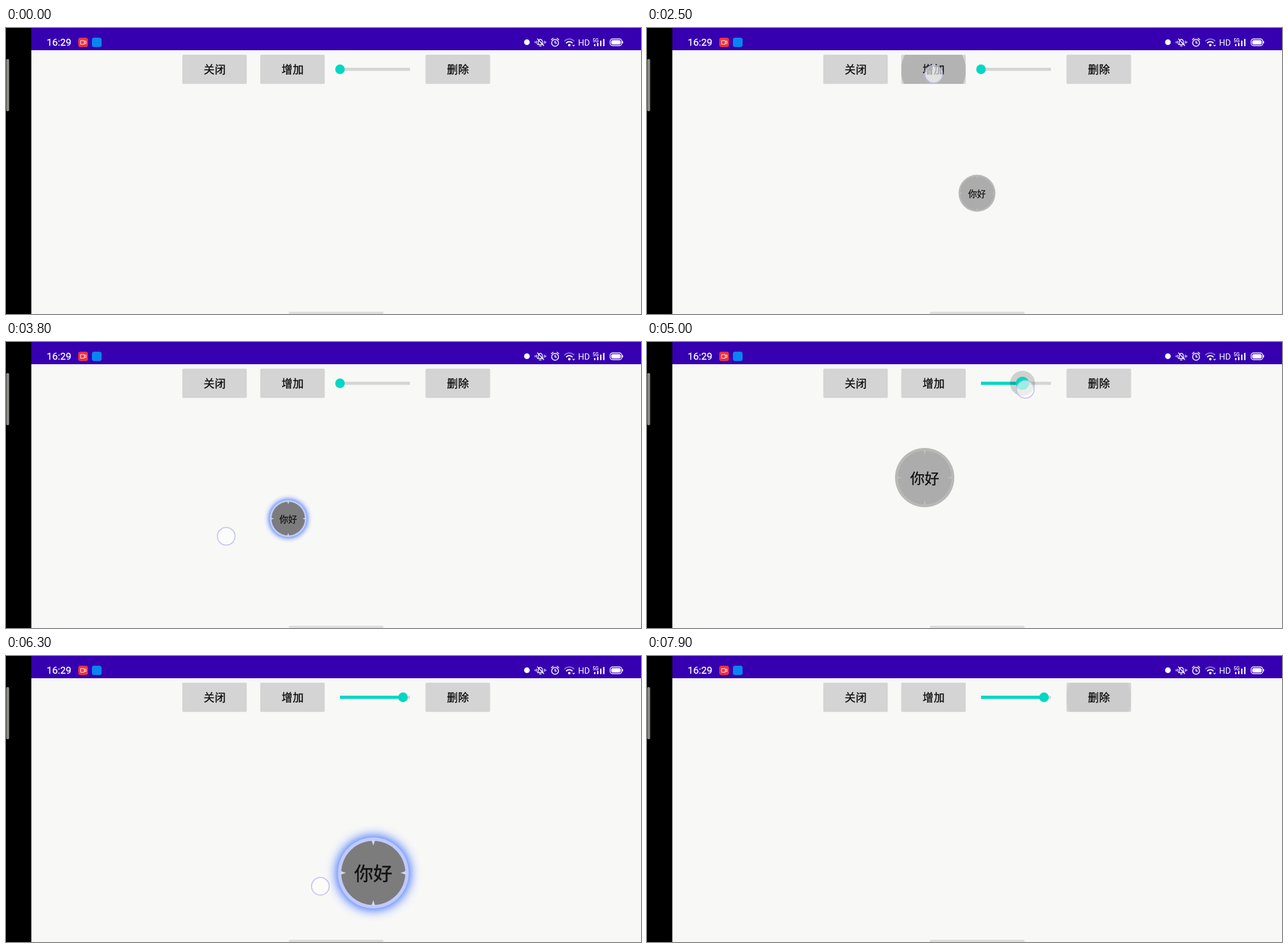
An HTML page with a canvas that plays this animation: 1116 px wide and 502 px high, repeating every 8 s.

```html
<!DOCTYPE html>
<html lang="zh">
<head>
<meta charset="utf-8">
<style>
  html, body { margin: 0; width: 100%; height: 100%; overflow: hidden; background: #f8f8f7; }
  canvas { display: block; }
</style>
</head>
<body>
<canvas id="stage" width="1116" height="502"></canvas>
<script>
const c = document.getElementById('stage').getContext('2d');
const FONT = 'Roboto, "Noto Sans CJK SC", "Noto Sans CJK", sans-serif';
const LOOP = 8000, STEP = 100;
const TRACK = { from: 587, to: 710, y: 72.5 };

const clamp = v => Math.max(0, Math.min(1, v));
const ramp = (t, a, b) => clamp((t - a) / (b - a));
const ease = v => v * v * (3 - 2 * v);
const within = (t, a, b) => t >= a && t < b;

// Catmull-Rom through rows of [time, value, value...]
function along(t, keys) {
  const last = keys.length - 1;
  if (t <= keys[0][0]) return keys[0].slice(1);
  if (t >= keys[last][0]) return keys[last].slice(1);
  const i = keys.findIndex(k => k[0] > t) - 1;
  const u = ramp(t, keys[i][0], keys[i + 1][0]);
  const at = n => keys[Math.max(0, Math.min(last, n))];
  return keys[i].slice(1).map((_, j) => {
    const [p, q, r, s] = [i - 1, i, i + 1, i + 2].map(n => at(n)[j + 1]);
    return q + u / 2 * (r - p + u * (2 * p - 5 * q + 4 * r - s + u * (3 * (q - r) + s - p)));
  });
}

const firstDrag = [[2900, 580, 290], [3100, 592, 299], [3400, 600, 329], [3600, 554, 363],
  [3800, 496, 310], [4000, 474, 256], [4200, 488, 238]];
const secondDrag = [[5800, 488, 238], [5950, 404, 294], [6100, 470, 386], [6300, 645.5, 380.7],
  [6450, 855, 290], [6600, 775, 170], [6800, 706, 296], [7000, 700, 359]];
const slide = [[4800, 0], [4900, .27], [5000, .593], [5200, 1], [5300, .97], [5400, .9]];

function text(str, x, baseline, size, color, { align = 'left', weight = 400, spacing = 0, bold = 0 } = {}) {
  c.font = `${weight} ${size}px ${FONT}`;
  c.textAlign = align;
  c.letterSpacing = spacing + 'px';
  c.fillStyle = c.strokeStyle = color;
  c.fillText(str, x, baseline);
  if (bold) {
    c.lineWidth = bold;
    c.strokeText(str, x, baseline);
  }
  c.letterSpacing = '0px';
}

function box(x, y, w, h, r, color) {
  c.beginPath();
  c.roundRect(x, y, w, h, r);
  c.fillStyle = color;
  c.fill();
}

function disc(x, y, r, color) {
  c.beginPath();
  c.arc(x, y, r, 0, 7);
  c.fillStyle = color;
  c.fill();
}

function stroke(path, color = '#fff', width = 1.6) {
  c.strokeStyle = color;
  c.lineWidth = width;
  c.lineCap = c.lineJoin = 'round';
  c.stroke(new Path2D(path));
}

function faded(alpha, draw) {
  if (alpha <= 0) return;
  c.save();
  c.globalAlpha *= alpha;
  draw();
  c.restore();
}

function shadow(color, blur, dy = 0) {
  c.shadowColor = color;
  c.shadowBlur = blur;
  c.shadowOffsetY = dy;
}

function statusIcons(t) {
  disc(915.5, 25, 5, '#fff');
  // muted bell
  stroke('M934 29h10l-1.500-2.500v-3a3.500 3.500 0 0 0-7 0v3zM937.500 31.500h3M934 19l11 12', '#fff', 1.4);
  stroke('M932.500 23v4M930 24v2M946 23v4M948.500 24v2', '#fff', 1.3);
  // alarm
  stroke('M971 26a6 6 0 1 0-12 0a6 6 0 1 0 12 0M965 23v3.500h2.500M958.500 20.500l3-2.500M968.500 18l3 2.500');
  // wifi
  const strong = within(t, 800, 1800);
  stroke('M982 22.500a11.500 11.500 0 0 1 16 0', strong ? '#fff' : '#8c70d5', 2);
  stroke('M985 26a7.500 7.500 0 0 1 10 0', '#fff', 2);
  disc(990, 30, 2.2, '#fff');
  stroke('M996 30l1.500 1.500l1.500-1.500', '#fff', 1.2);
  text('HD', 1005.5, 31, 15, '#fff');
  text('5G', 1031, 24.5, 8.5, '#fff', { weight: 500 });
  [4, 6, 10, 13].forEach((h, i) => box(1033.5 + i * 5.3, 32 - h, 2.4, h, 1, '#fff'));
  c.strokeStyle = '#fff';
  c.lineWidth = 1.4;
  c.beginPath();
  c.roundRect(1061.7, 19.2, 20.6, 11.8, 4);
  c.stroke();
  box(1063.7, 21.2, 16.6, 7.8, 2.5, '#fff');
  box(1083, 23, 1.5, 4, 1, '#fff');
}

function statusBar(t, banner) {
  box(44, 0, 1072, 39, 0, '#3600b1');
  faded(1 - banner, () => {
    text('16:29', 71.5, 31, 17.4, '#fff', { bold: .3 });
    box(127, 17, 17, 16.5, 4, '#f0303f');
    stroke('M131.500 22h6v6.500h-6zM137.500 24.500l3-1.800v5l-3-1.800', '#fff', 1);
    box(151, 17, 17, 16.5, 4, '#0a84f0');
  });
  faded(banner, () => {
    disc(263.5, 25, 7, '#fff');
    text('絮笺', 280.5, 31.5, 16.5, '#fff');
  });
  statusIcons(t);
}

function button(label, x, ripple = 0, fade = 0) {
  c.save();
  shadow('rgba(0,0,0,.1)', 2);
  box(x, 47, 113, 51, 2, '#d4d4d4');
  c.restore();
  if (ripple && fade < 1) {
    c.save();
    c.beginPath();
    c.rect(x, 47, 113, 51);
    c.clip();
    disc(x + 56.5, 74, 8 + 49 * ripple, `rgba(0,0,0,${.155 * (1 - fade)})`);
    c.restore();
  }
  text(label, x + 57, 80.2, 19, '#111', { align: 'center', weight: 500, spacing: .5, bold: .4 });
}

function slider(p, pressed) {
  const x = TRACK.from + (TRACK.to - TRACK.from) * p;
  box(TRACK.from, TRACK.y - 2.8, TRACK.to - TRACK.from, 5.6, 0, '#d5d5d5');
  box(TRACK.from, TRACK.y - 2.8, x - TRACK.from, 5.6, 0, '#00d8c1');
  if (pressed) disc(x, TRACK.y, 22, 'rgba(0,0,0,.16)');
  disc(x, TRACK.y, pressed ? 11.5 : 8.4, '#00d8c1');
}

function ball(x, y, p, active) {
  const r = 32.5 + 33 * p, size = 15.5 + 10.5 * p + 10.5 * p * p;
  const ring = active ? '#c0cafb' : '#b8b8b6';
  c.save();
  if (active) {
    shadow('rgba(70,120,255,.85)', r * .3);
    disc(x, y, r, ring);
  }
  disc(x, y, r, ring);
  c.restore();
  disc(x, y, r * .905, active ? '#7c7c7c' : '#acacac');
  c.fillStyle = active ? '#d0d6fa' : '#bcbcba';
  for (let i = 0; i < 4; i++) {
    c.save();
    c.translate(x, y);
    c.rotate(i * Math.PI / 2);
    c.beginPath();
    c.moveTo(-r * .05, -r * .92);
    c.lineTo(r * .05, -r * .92);
    c.lineTo(0, -r * .77);
    c.fill();
    c.restore();
  }
  text('你好', x, y + 1 + size * .38, size, '#111', { align: 'center', bold: size * .015 });
}

function touch(x, y) {
  disc(x, y, 15.5, 'rgba(255,255,255,.6)');
  c.strokeStyle = 'rgba(185,185,230,.75)';
  c.lineWidth = 2;
  c.stroke();
}

function banner(shown) {
  faded(shown, () => {
    c.translate(0, -125 * (1 - shown));
    c.save();
    shadow('rgba(0,0,0,.2)', 5);
    box(194, 56.5, 728, 118.5, 8, '#fcfcfb');
    c.restore();
    text('晨露中六班00451200', 221, 108.3, 18, '#222');
    text('[56条]穆沐禾爸爸00012345678: @甘老师00087654321 [偷笑][偷笑][偷笑]..', 221, 133.8, 18, '#222');
    const tones = ['#efdfe2', '#b4bca6', '#9fb4c4', '#c01f2c', '#eadcda', '#7c2027', '#98a4ae', '#59302b', '#ecd3d0'];
    c.beginPath();
    c.roundRect(850, 89, 45, 45, 8);
    c.fillStyle = '#e4e4e4';
    c.fill();
    c.clip();
    tones.forEach((tone, i) => box(851 + i % 3 * 15, 90 + Math.floor(i / 3) * 15, 13.5, 13.5, 0, tone));
  });
}

function draw(t) {
  const shown = ease(ramp(t, 0, 500)) * (1 - ease(ramp(t, 1600, 2100)));
  const [p] = along(t, slide);
  const sliding = within(t, 4800, 5500);
  const dragging = within(t, 2900, 4300) || within(t, 5800, 7100);
  const early = t < 5000;
  const [x, y] = along(t, early ? firstDrag : secondDrag);

  box(0, 0, 1116, 502, 0, '#f8f8f7');
  box(497, 498, 166.5, 6, 2, '#dededc');
  button('关闭', 310);
  button('增加', 447, ramp(t, 2200, 2500), ramp(t, 2500, 2800));
  button('删除', 737.5, ramp(t, 7300, 7600), ramp(t, 7600, 8000));
  slider(p, sliding);
  if (within(t, 2400, 7700)) ball(x, y, p, dragging);
  statusBar(t, shown);
  banner(shown);
  box(0, 0, 44.5, 502, 0, '#000');
  box(.5, 54.5, 5, 91.5, 2, '#8b8b87');

  if (within(t, 2300, 2600)) touch(504, 81);
  if (sliding) touch(TRACK.from + (TRACK.to - TRACK.from) * p + 5, 83);
  if (dragging) early ? touch(x - 109, y + 31) : touch(x - 93, y + 23.5);
  if (within(t, 7400, 7700)) touch(794, 80);
}

function tick(now) {
  draw(Math.floor(now % LOOP / STEP) * STEP);
  requestAnimationFrame(tick);
}
requestAnimationFrame(tick);
</script>
</body>
</html>
```
